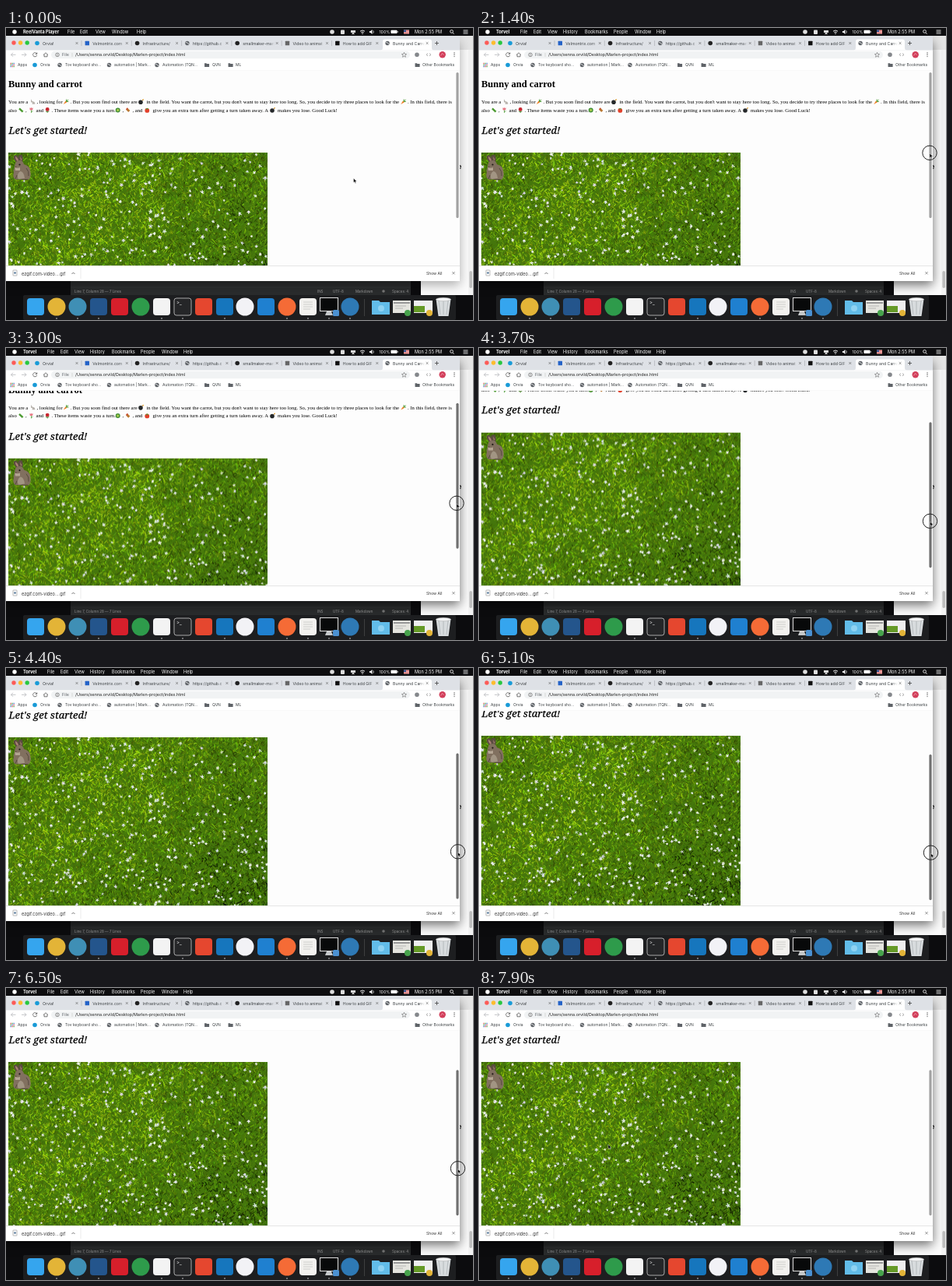
An HTML page with a canvas that plays this animation: 600 by 375 pixels, repeating every 8000 ms.

```html
<!DOCTYPE html>
<html lang="en">
<head>
<meta charset="utf-8">
<style>
html, body { margin: 0; width: 100%; height: 100%; overflow: hidden; background: #0c0c0e; }
#stage { position: relative; width: 600px; height: 375px; overflow: hidden; }
svg { position: absolute; left: 0; top: 0; }
#view { position: absolute; left: 0; top: 55px; width: 583px; height: 250px; overflow: hidden; background: #fdfdfd; }
#page { position: absolute; left: 0; top: -55px; width: 583px; height: 390px; }
#page canvas { position: absolute; left: 3.4px; top: 159.5px; }
text { font-family: Inter, Roboto, sans-serif; white-space: pre; }
.serif { font-family: "Liberation Serif", serif; }
.title { font-family: "Noto Serif", serif; font-style: italic; stroke: #000; stroke-width: .25; }
</style>
</head>
<body>
<div id="stage">
  <svg id="desk" width="600" height="375"></svg>
  <div id="view"><div id="page">
    <canvas id="lawn" width="333" height="222"></canvas>
    <svg id="content" width="583" height="390"></svg>
  </div></div>
  <svg id="over" width="600" height="375">
    <rect id="thumb" x="578.4" y="57" width="3.2" height="187" rx="1.6"/>
    <g id="pointer">
      <circle id="press" cy="-.7" r="9.2" fill="none" stroke="#222" stroke-width="1"/>
      <path d="M0 0V5.6L1.4 4.4L2.3 6.4L3.2 6L2.3 4.1H4Z" fill="#000" stroke="#fff" stroke-width=".4"/>
    </g>
  </svg>
</div>
<script>
const $ = id => document.getElementById(id);
const text = (x, y, s, size, fill = '#333', extra = '') =>
  `<text x="${x}" y="${y}" font-size="${size}" fill="${fill}" ${extra}>${s}</text>`;
const rect = (x, y, w, h, fill, r = 0, extra = '') =>
  `<rect x="${x}" y="${y}" width="${w}" height="${h}" rx="${r}" fill="${fill}" ${extra}/>`;
const dot = (x, y, r, fill) => `<circle cx="${x}" cy="${y}" r="${r}" fill="${fill}"/>`;
const line = (d, stroke = '#5f6368', w = .8) =>
  `<path d="${d}" fill="none" stroke="${stroke}" stroke-width="${w}"/>`;
const shape = (d, fill) => `<path d="${d}" fill="${fill}"/>`;
const cross = (x, y, r = 1.4) => line(`M${x - r} ${y - r}l${2 * r} ${2 * r}m0 ${-2 * r}l${-2 * r} ${2 * r}`, '#555', .6);
const globe = (x, y) => dot(x, y, 2.7, '#5f6368') + line(`M${x - 2} ${y - .8}h2l1 1.6h1.3`, '#fff', .7);
const folder = (x, y) => shape(`M${x - 3} ${y - 2}h2.3l.8.8h3v4h-6z`, '#5f6368');

function menuBar() {
  const menu = (id, app, items) => `<g id="${id}">` + text(22, 7, app, 5.6, '#fff', 'font-weight="700"') +
    items.map(([x, s]) => text(x, 7, s, 5.6, '#fff')).join('') + '</g>';
  return rect(0, 0, 600, 10, '#0d0d0f') + dot(11, 5, 2.7, '#fff') +
    menu('menuA', 'ReelVanta Player', [[79, 'File'], [95, 'Edit'], [115, 'View'], [136, 'Window'], [168, 'Help']]) +
    menu('menuB', 'Torvel', [[53, 'File'], [70, 'Edit'], [88, 'View'], [108, 'History'], [136, 'Bookmarks'],
      [173, 'People'], [200, 'Window'], [228, 'Help']]) +
    dot(419, 5, 2.8, '#ddd') + rect(430, 2.5, 5, 5.5, '#ddd', 1) +
    shape('M443 3h6v3h-6zM444 8l2-2.5l2 2.5z', '#ddd') +
    line('M455 4.2q3-2.4 6 0M456.3 5.8q1.7-1.3 3.4 0', '#fff', .9) + dot(458, 7.3, .7, '#fff') +
    shape('M467 4h1.4l2-2v6l-2-2H467z', '#fff') + line('M471.6 3.2q1.5 1.8 0 3.6', '#fff', .7) +
    text(479.5, 7, '100%', 5.2, '#fff') + rect(494.5, 2.8, 8, 4.2, '#fff', .8) + rect(502.8, 4, .8, 1.8, '#fff') +
    rect(511, 2.5, 7, 5, '#eee') + line('M511 3.3h7M511 5h7M511 6.7h7', '#d33', .8) + rect(511, 2.5, 3, 2.6, '#35508f') +
    text(525, 7, 'Mon 2:55 PM', 5.6, '#fff') +
    `<circle cx="572.5" cy="4.4" r="1.9" fill="none" stroke="#fff" stroke-width=".8"/>` +
    line('M574 6l1.6 1.8', '#fff') + line('M587.5 3h6M587.5 5h6M587.5 7h6', '#fff');
}

function tabStrip() {
  const titles = ['Orvia!', 'Velmontrix.com', 'Infrastructure/', 'https://github.c', 'smallmaker-marl',
    'Video to animat', 'How to add GIF', 'Bunny and Carro'];
  const fade = (id, c) => `<linearGradient id="${id}"><stop stop-color="${c}" stop-opacity="0"/><stop offset="1" stop-color="${c}"/></linearGradient>`;
  const icons = [[1, '#1a9bd7'], [0, '#2463c8'], [1, '#222'], 0, [1, '#222'], [0, '#666'], [0, '#111'], 0];
  return `<defs>${fade('fade', '#dee1e6')}${fade('fadeW', '#fff')}</defs>` + rect(0, 10, 583, 19, '#dee1e6') +
    ['#fc5b57', '#fdbc2e', '#28c840'].map((c, i) => dot(10 + i * 8.6, 19, 2.7, c)).join('') +
    shape('M481 28.5q3 0 3-3v-8q0-3 3-3h57q3 0 3 3v8q0 3 3 3z', '#fff') +
    titles.map((s, i) => {
      const x = 40 + i * 64.3, active = i === 7, icon = icons[i];
      return (icon ? icon[0] ? dot(x, 19.5, 2.8, icon[1]) : rect(x - 2.7, 16.8, 5.4, 5.4, icon[1], .5) : globe(x, 19.5)) +
        text(x + 7, 21.5, s, 5.2, '#3c4043') + rect(x + 41, 16, 7, 8, `url(#fade${active ? 'W' : ''})`) +
        rect(x + 48, 16, 7, 8, active ? '#fff' : '#dee1e6') + cross(x + 51, 19.5) +
        (i < 6 ? line(`M${x + 57} 16v7`, '#9a9da2', .5) : '');
    }).join('') + line('M551 19.5h5M553.5 17v5', '#444');
}

function toolBar() {
  return rect(0, 28.5, 583, 27, '#fff') +
    line('M12.5 34.3h-6m2.5-2.5l-2.5 2.5l2.5 2.5M20 34.3h6m-2.5-2.5l2.5 2.5l-2.5 2.5', '#b5b7ba') +
    line('M39.5 33a2.6 2.6 0 1 0 .2 2M39.8 31.5v2h-2M48 34.5l3-2.7l3 2.7M49 34v2.8h4v-2.8', '#555') +
    rect(58, 29.8, 461, 9.4, '#f1f3f4', 4.7) +
    `<circle cx="66" cy="34.4" r="2.3" fill="none" stroke="#666" stroke-width=".7"/>` + line('M66 33.8v1.8M66 32.7v.6', '#666', .7) +
    text(72, 36.4, 'File', 5.4, '#5f6368') + line('M85 32v5', '#bbb', .5) +
    text(89, 36.4, '/Users/senna.orvild/Desktop/Marlen-project/index.html', 5.4, '#222') +
    line('M511.5 31.4l.9 2l2.2.2l-1.7 1.5l.5 2.2l-1.9-1.2l-1.9 1.2l.5-2.2l-1.7-1.5l2.2-.2z', '#666', .6) +
    dot(528, 34.3, 2.8, '#85888c') + line('M540 34.3l2-1.6m2 0l2 1.6l-2 1.6m-2 0l-2-1.6', '#999') +
    dot(560.7, 34.2, 4.2, '#d23f5b') + line('M558.5 35.5l2-3l2 2', '#f6b7c2', .7) +
    [32, 34.3, 36.6].map(y => dot(576, y, .7, '#555')).join('') +
    [0, 1, 2].map(i => [0, 1, 2].map(j => rect(5.5 + i * 2, 44.8 + j * 2, 1.4, 1.4, ['#d55', '#5a5', '#57c'][(i + j) % 3])).join('')).join('') +
    dot(37, 47.5, 2.8, '#1a9bd7') + [69, 132.5, 194].map(x => globe(x, 47.5)).join('') +
    [258, 288.5, 528.5].map(x => folder(x, 47.2)).join('') +
    [[15, 'Apps'], [44, 'Orvia'], [76, 'Tov keyboard sho...'], [139, 'automation | Mark...'], [201, 'Automation (TQN...'],
      [265, 'QVN'], [295, 'ML'], [535, 'Other Bookmarks']].map(([x, s]) => text(x, 49.4, s, 5, '#3c4043')).join('') +
    line('M0 55.2h583', '#ddd', .6);
}

function dock() {
  // [centre, colour, is round, is running]
  const icons = [[38, '#35a5ee', 0, 1], [65, '#e3b437', 1, 1], [92, '#3f8fb5', 1, 1], [119, '#24558c', 0, 1], [146, '#d71f2b', 0, 0],
    [173, '#2e9b4b', 1, 0], [200, '#f3f3f3', 0, 1], [227, '#252628', 0, 1], [254, '#e5472f', 0, 0], [281, '#1676bd', 0, 1],
    [307, '#f2f2f6', 1, 0], [334, '#1f80d0', 0, 0], [361, '#f56b36', 1, 1], [388, '#f2f1ee', 0, 1], [442, '#2e79b5', 1, 1]];
  return rect(22, 343, 556, 32, '#1d1e20', 2) +
    icons.map(([x, c, round, on]) => (round ? dot(x, 358, 11.5, c) : rect(x - 11, 347, 22, 22, c, 4)) +
      (on ? dot(x, 373, .8, '#ddd') : '')).join('') +
    rect(216, 347, 22, 22, 'none', 3, 'stroke="#a8a8a8"') + text(219, 355, '&gt;_', 6, '#eee') +
    line('M382 352h12M382 355h12M382 358h12M382 361h9', '#aaa', .5) +
    rect(403.5, 346.5, 23, 17, '#08090a', 0, 'stroke="#ddd"') + shape('M412 364h6l2 5h-10z', '#c5c8ca') +
    rect(420, 362, 8, 8, '#4b91d1', 1.5) + dot(415, 373, .8, '#ddd') +
    line('M460.5 348v22', '#555', .6) +
    shape('M470 350h9l2 2h12v16h-23z', '#62bce8') + dot(482, 360, 4, '#8ed2f2') +
    rect(497, 350, 23, 16, '#e5e5df') + rect(498, 352, 21, 2, '#999') + line('M500 357h14M500 360h10', '#999', .6) + dot(516, 366, 4, '#47a34c') +
    rect(524, 350, 24, 16, '#eee') + rect(524, 357, 14, 8, '#659a27') + dot(544, 366, 4, '#e3b437') +
    shape('M552.5 348h19l-3 22h-13z', '#d8dcde') + line('M556 350l2 18M562 350v18M568 350l-2 18', '#a7adb0', .7) +
    `<ellipse cx="562" cy="348.5" rx="9.5" ry="2.2" fill="#f4f5f6" stroke="#aaa" stroke-width=".5"/>`;
}

function desktop() {
  const status = [[88, 'Line 7, Column 28 — 7 Lines'], [400, 'INS'], [420, 'UTF-8'], [449, 'Markdown'], [496, 'Spaces: 4']];
  return '<filter id="soft" x="-20%" y="-20%" width="140%" height="140%"><feGaussianBlur stdDeviation="7"/></filter>' +
    rect(0, 0, 600, 375, '#0c0c0e') + rect(83, 320, 437, 23, '#2a2c2d') +
    line('M83 333h437', '#3a3c3d', .5) + status.map(([x, s]) => text(x, 339.5, s, 4.5, '#999')).join('') + dot(485, 338, 1.8, '#777') +
    rect(533, 10, 67, 333, '#fafafa') + rect(583, 10, 17, 18, '#e4e4e4') +
    rect(594, 28, 6, 315, '#f2f2f2') + rect(595.4, 312, 3.6, 22, '#bdbdbd', 1.8) +
    text(580.5, 181, 'e', 8, '#111', 'font-weight="700"') +
    rect(-9, 18, 592, 312, '#000', 3, 'id="shadow" filter="url(#soft)"') +
    rect(0, 305, 583, 20, '#fff') + line('M0 305.3h583', '#ccc', .6) +
    rect(9, 311, 5, 7, '#fff', .5, 'stroke="#888" stroke-width=".6"') + dot(11.5, 314.5, 1.3, '#579') +
    text(20, 317.5, 'ezgif.com-video....gif', 5.6, '#333') + line('M84.5 316l2-2l2 2', '#555') + line('M96 308v14', '#ddd', .6) +
    text(540, 316.5, 'Show All', 5, '#333') + cross(575, 314.7, 1.7) + menuBar() + tabStrip() + toolBar() + dock();
}

const glyphs = {
  rabbit: shape('M1 0l1.5 2.5L4 3.2q2.5.3 2.3 3.3H2.5L3 4.5L1 4z', '#b9b4ae'),
  carrot: shape('M.3 6.7L3 2.3L5 4z', '#ef7d22') + line('M4 3l2.6-2.2M4 3L4.2.3M4 3l2.8.3', '#4b9b35', 1),
  bomb: dot(3, 4, 2.8, '#25282a') + line('M4.7 2l1.4-1.2', '#996633', 1) + dot(6.2, .8, .8, '#e9a62c'),
  cucumber: line('M1 1.3L5.6 5.6', '#4c9b31', 2.4),
  tulip: shape('M1 .3l1 .8l1-1l1 1l1-.8v2.4q-2 2-4 0z', '#e87986') + line('M3 3.5v3.3M3 6l2-1.5', '#4b9b35', .8),
  rose: dot(3.2, 2.5, 2.4, '#c7252f') + line('M3.2 4.8v2M1 4.8l2.2 1l2.2-1', '#46852d', .9),
  melon: dot(3.2, 3.5, 3, '#3d8a35') + dot(3.2, 3.5, 1.7, '#a5c94b'),
  nut: line('M1.8 2L4.8 5', '#b97832', 3) + line('M1 2.8L2.9.8', '#c94a31', 1.5),
  tomato: dot(3.3, 3.9, 2.9, '#e1412b') + line('M1.6 1.8h3.4M3.3.8v2', '#4b9b35', .8)
};

function article() {
  const run = (y, parts) => parts.map(([x, s]) => s in glyphs
    ? `<g transform="translate(${x} ${y - 5.7})">${glyphs[s]}</g>`
    : text(x, y, s, 6.67, '#000', 'class="serif"')).join('');
  const bunny = shape('M10 164q-1 5 4 9l3-1q0-6-4-9zM16 163.5q-1 5 2 8l3 .2q2-5-1-9z', '#5b4c40') +
    shape('M12 165q0 4 3 6l1-1q-1-4-4-5zM18 165l1 5l1.5-1z', '#a98175') +
    shape('M14 171q7-3 9 4q8 2 8.5 10q1 6-2 9.5H12q-4-3-2-9q-1-3 1-6q0-6 3-8.5z', '#81705f') +
    shape('M18 184q5 0 6 9l-8 1q-3-5 2-10z', '#a29583') + shape('M11 178q3 3 7 1v4h-6z', '#b4a593') +
    dot(17.5, 175.5, 1.1, '#1e1815') + dot(12.5, 178.5, .8, '#54392f') +
    line('M12 194l2-5M20 194.5h8M26 180q4 4 3 10', '#54483d', 1);
  return text(3, 76.3, 'Bunny and carrot', 12.5, '#000', 'class="serif" font-weight="700"') +
    run(97, [[3, 'You are a'], [31, 'rabbit'], [39.5, ', looking for'], [73.5, 'carrot'], [82.5, '. But you soon find out there are'],
      [170, 'bomb'], [180.5, "in the field. You want the carrot, but you don't want to stay here too long. So, you decide to try three places to look for the"],
      [507, 'carrot'], [516, '. In this field, there is']]) +
    run(107.7, [[3, 'also'], [16, 'cucumber'], [25, ','], [29.5, 'tulip'], [38.5, 'and'], [50, 'rose'],
      [58.5, '. These items waste you a turn.'], [140.5, 'melon'], [149.5, ','], [153.5, 'nut'], [162.5, ', and'],
      [178, 'tomato'], [188.5, 'give you an extra turn after getting a turn taken away. A'], [339, 'bomb'], [349, 'makes you lose. Good Luck!']]) +
    text(3.5, 136, "Let's get started!", 13, '#000', 'class="title"') + bunny;
}

function paintLawn() {
  const g = $('lawn').getContext('2d'), W = 333, H = 222;
  let seed = 7;
  const rnd = (a = 0, b = 1) => {
    seed = (seed * 16807) % 2147483647;
    return a + (b - a) * seed / 2147483647;
  };
  const glow = (x, y, cx, cy, r) => Math.exp(-((x - cx) ** 2 + (y - cy) ** 2) / r ** 2);
  g.fillStyle = '#45760c';
  g.fillRect(0, 0, W, H);
  for (let i = 0; i < 15000; i++) {
    const x = rnd(0, W), y = rnd(0, H), a = rnd(-2.8, -.3), len = rnd(2, 5.5);
    const sun = glow(x, y, 130, 50, 95) + .8 * glow(x, y, 40, 150, 60) - glow(x, y, 310, 210, 90) +
      .35 * Math.sin(x / 17 + y / 31) * Math.sin(y / 14 - x / 40);
    g.strokeStyle = `hsl(${rnd(74, 92) - 5 * sun} ${rnd(75, 95)}% ${rnd(11, 42) + 8 * sun}%)`;
    g.lineWidth = rnd(.5, 1.2);
    g.beginPath();
    g.moveTo(x, y);
    g.lineTo(x + Math.cos(a) * len, y + Math.sin(a) * len);
    g.stroke();
  }
  for (let i = 0; i < 400; i++) {
    const x = rnd(0, W), y = rnd(0, H), r = rnd(1.4, 3.1), turn = rnd(0, 6.28);
    g.strokeStyle = `hsl(${rnd(70, 260)} 22% ${rnd(84, 97)}%)`;
    g.lineWidth = rnd(.9, 1.4);
    g.beginPath();
    for (let k = 0; k < 5; k++) {
      const a = turn + k * 1.257, p = r * rnd(.5, 1.1);
      g.moveTo(x, y);
      g.lineTo(x + Math.cos(a) * p, y + Math.sin(a) * p);
    }
    g.stroke();
  }
}

// First press focuses the window, the second drags the scrollbar.
const LOOP = 8000, FOCUS = 1200, LIFT = 1700, GRAB = 2300, RELEASE = 6800, GRAB_Y = 187.2;
const path = [[0, 446.5, 193], [200, 447, 193], [850, 579, 161], [1600, 579, 161], [2300, 579, GRAB_Y], [2500, 579, GRAB_Y],
  [3000, 579, 200], [3700, 579.5, 223], [4400, 580.5, 236.5], [5000, 580.5, 238], [5400, 580.5, 237.5], [6100, 580.5, 232.4],
  [6800, 580.5, 232.4], [7200, 480, 222], [7700, 180, 204], [7900, 166, 201], [LOOP, 166, 201]];

function pointerAt(t) {
  const i = path.findIndex(p => p[0] > t), a = path[i - 1], b = path[i];
  const k = (t - a[0]) / (b[0] - a[0]);
  return [a[1] + (b[1] - a[1]) * k, a[2] + (b[2] - a[2]) * k];
}

function draw(t) {
  const [x, y] = pointerAt(t), focused = t >= FOCUS;
  const dragging = t >= GRAB && t < RELEASE;
  const held = dragging || (focused && t < LIFT);
  const scroll = t < GRAB ? 0 : (pointerAt(Math.min(t, RELEASE))[1] - GRAB_Y) * 1.44;
  const show = (id, on) => { $(id).style.display = on ? '' : 'none'; };
  $('page').style.transform = `translateY(${-scroll}px)`;
  $('thumb').setAttribute('y', 57 + scroll * .74);
  $('thumb').setAttribute('fill', dragging ? '#707070' : '#a2a2a2');
  $('shadow').setAttribute('opacity', focused ? .55 : .3);
  $('pointer').setAttribute('transform', `translate(${x} ${y})`);
  show('press', held);
  show('menuA', !focused);
  show('menuB', focused);
}

$('desk').innerHTML = desktop();
$('content').innerHTML = article();
paintLawn();
const start = performance.now();
function tick() {
  draw(Math.floor((performance.now() - start) % LOOP / 100) * 100);
  requestAnimationFrame(tick);
}
tick();
</script>
</body>
</html>
```
